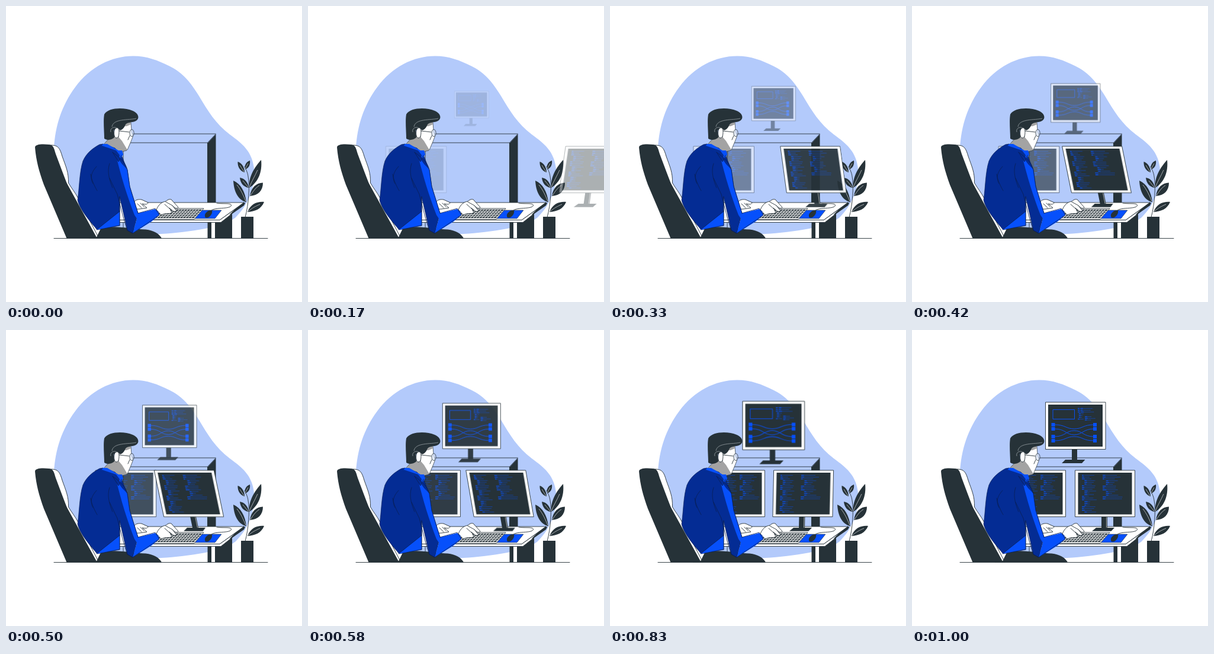
These frames come from a looping animation (500x500 px, 1.04 s). An HTML page:

```html
<!DOCTYPE html>
<html lang="en">
<head>
<meta charset="utf-8">
<title>Desk with monitors</title>
<style>
  html, body { margin: 0; width: 100%; height: 100%; overflow: hidden; background: #fff; }
  svg { display: block; width: 100vw; height: 100vh; }
  .ink { fill: #263238; }
  .paper { fill: #fff; stroke: #263238; stroke-width: .9; stroke-linejoin: round; }
  .line { fill: none; stroke: #263238; stroke-width: .9; stroke-linecap: round; stroke-linejoin: round; }
  .navy { fill: #042c94; }
  .blue { fill: #0650fb; }
  .grey { fill: #a3a3a3; }
  .fold { fill: none; stroke: #0a1f55; stroke-width: .8; stroke-linecap: round; }
  .vein { fill: none; stroke: #fff; stroke-width: .6; }
  .glow { fill: none; stroke: #0b50f0; stroke-width: 1; }
  .bold, .thin { fill: none; stroke: #0b4de0; stroke-width: 1.5; }
  .thin { stroke-width: .9; stroke-dasharray: 1.3 .8; }
  #left, #right, #top { transform-box: view-box; }
  #right { transform-origin: 325.5px 288px; }
  #top { transform-origin: 276.2px 173px; }
</style>
</head>
<body>
<svg viewBox="0 0 500 500" xmlns="http://www.w3.org/2000/svg">
  <path fill="#b3cafb" d="M81 240C83 203 94 168 117 137C142 103 178 84.500 215 84.500C238 84.500 257 92 275 101C299 112 313 131 326 152C341 177 354 199 378 217C400 233 416 246 419 275C421 305 411 334 388 357C368 374 310 382 262 385C200 389 140 380 105 330C88 302 80 270 81 240Z"/>

  <!-- shelf -->
  <path class="line" d="M200 216H354M198 231H340M198 231V332M198 366V380"/>
  <path class="ink" d="M340 231L354.500 215.500V333H340Z"/>
  <path d="M341 231L354 217" stroke="#7f93c4" stroke-width=".5"/>

  <!-- desk -->
  <path class="ink" d="M340.500 364H347V392H340.500ZM353 392V366H361L382 350V392Z"/>
  <path fill="#fff" d="M347 365H353V392H347Z"/>
  <path class="paper" d="M190 361.500H361L402 332.500L384 349L363 365.500H190Z"/>
  <path class="paper" d="M190 332H402L361 361.500H190Z"/>
  <path class="ink" d="M402 331.500L404 333L402 337L382 351L377 353L386 344Z"/>
  <path class="blue" stroke="#263238" stroke-width=".6" d="M331 345H364L353 359H319Z"/>
  <path class="line" d="M346 346C352 339 378 344 380.500 337C381 332 366 335 356 333"/>
  <path class="ink" d="M336 355C335 350 341 345 347 345C350 347 347 354 342 357C339 358 336 358 336 355Z"/>

  <path class="line" d="M81 392.500H442"/>

  <!-- plant -->
  <path class="line" d="M404 357C410 335 412 304 409 288C408 280 405 276 403 271"/>
  <g class="ink">
    <path d="M397 356H418V392.500H397Z"/>
    <path d="M411 307C409 289 420 272 431 260C433 279 427 297 411 307Z"/>
    <path d="M406 331.500C404 313 396 300 384 295C385 313 391 327 406 331.500Z"/>
    <path d="M412 321C414 306 423 299 434 298.500C434 312 426 320 412 321Z"/>
    <path d="M408 348C413 334 425 330 436 331C431 343 421 347 408 348Z"/>
    <path d="M410 307C409 298 403 291 395 290C396 300 402 306 410 307Z"/>
    <path d="M403 281C403 272 398 265 391.500 263C391 271 395 279 403 281Z"/>
    <path d="M404 276C402 269 406 263 412 261C413 268 410 274 404 276Z"/>
  </g>
  <path class="vein" d="M411 306C415 296 420 288 425 277M405 330C401 320 397 311 390 302M413 320C418 312 422 307 428 303M409 347C416 341 422 338 429 335M409 306L400 295M402 280L395 269M404 275L409 266"/>

  <!-- monitors -->
  <g id="left">
    <path class="paper" d="M157 237H259.500V315.500H157Z"/>
    <path class="ink" d="M162 241H254.500V311.500H162Z"/>
    <path class="bold"/><path class="thin"/>
  </g>
  <g id="top">
    <path class="ink" d="M270 201H279V220H270ZM259 219H292.500L287 225H253Z"/>
    <path class="paper" d="M225.500 122H327V201.500H225.500Z"/>
    <path class="ink" d="M230 126H322V197H230Z"/>
    <path class="glow" d="M238 134.500H274.500V150.500H238Z"/>
    <path id="waves" class="glow"/>
    <path id="ports" class="blue"/>
    <path class="bold"/><path class="thin"/>
  </g>
  <g id="right">
    <path class="ink" d="M320 315H330V335H320ZM311 334H342L336.500 339.700H304Z"/>
    <path d="M328.500 316V334" stroke="#fff" stroke-width=".6"/>
    <path class="paper" d="M275.500 237H376.500V315.500H275.500Z"/>
    <path class="ink" d="M280.500 241H371.500V311.500H280.500Z"/>
    <path class="bold"/><path class="thin"/>
  </g>

  <!-- keyboard -->
  <path class="paper" d="M262 342H334L318 360H246Z"/>
  <path class="ink" d="M264 343.800H331L317.500 358H250Z"/>
  <path id="keys" fill="none" stroke="#fff" stroke-width="1"/>

  <!-- chair -->
  <path class="paper" d="M76 235C88 235 91 240 95 254C101 271 106 281 105.500 299C110 307 117 315 122 325L157 392.500H140Z"/>
  <path class="ink" d="M49 239C49 233 62 233 72 234C80 234 81 240 84 250L102 298L154 392.500H102.500L64 302C56 280 51 262 49 239Z"/>

  <!-- person -->
  <path class="ink" d="M152 392.500L160 376C185 369 212 377 236 377.500C250 379 259 385 263 392.500Z"/>
  <path class="paper" d="M216 333C217 328 222 326 229 327L240 332C239 336 234 335 230 334L238 341L225 343L217 343Z"/>
  <path class="line" d="M222 334L229 341M227 333L233 339"/>
  <path class="paper" d="M254 344C258 335 263 331 270 330C274 326 279 325 281 329L291 340C289 344 285 341 281 337L288 346C285 349 280 345 276 341L280 349C276 352 270 349 262 353Z"/>
  <path class="line" d="M270 331L281 337M268 335L276 342"/>

  <path class="grey" stroke="#263238" stroke-width=".6" d="M183 218L170 228L165 234L184 242L192 247L204 244L203 230Z"/>
  <path fill="#fff" stroke="#263238" stroke-width=".7" d="M190 203L211 197L212 210L214.500 220L211 229L205 243L198 236L190 222Z"/>
  <path class="grey" d="M196 203L202 196L211 195L211 200L204 203ZM189 220L196 228L205 243L196 244L188 229Z"/>
  <path class="ink" d="M166 183C173 171 200 171 214 177C223 181 226 188 221 193C215 198 206 195 202 200C199 207 196 209 193 210L189 207L182 210L183 222C178 227 170 227 166 224C166 212 164 194 166 183Z"/>
  <path fill="none" stroke="#a9b1b5" stroke-width=".7" d="M179 204C181 190 207 193 220 190M177 213C175 207 182 203 187 206"/>
  <path class="paper" stroke-width=".6" d="M183 211C184 204 191 204 191 211C191 219 190 223 186 223C183 222 182 216 183 211Z"/>
  <path class="line" d="M191 211L208 213M209 219L206 226"/>
  <ellipse cx="212.500" cy="214.500" rx="3.600" ry="6" fill="#d9e4fc" fill-opacity=".6" stroke="#263238" stroke-width=".8"/>

  <path class="navy" stroke="#0a1f55" stroke-width=".7" d="M158 234C147 240 136 248 130 262C124 280 124 308 121 328C125 345 144 366 154 378L192 371L192 322L205 379L214 384L223 350L209 305L205 277L195 252L184 240L164 233Z"/>
  <path class="blue" d="M153 378L192 347L192 370ZM186 253L196 267L205 276L209 305L223 350L252 343L257 347L259 353L246 364L214 384L221 359L217 353C205 322 194 287 186 253Z"/>
  <path class="blue" d="M164 233L171 233L190 244L196 244L198 251L193 258L185 247L161 237Z"/>
  <path class="navy" d="M162 236L186 244L192 252L190 263L179 248L158 238Z"/>
  <path class="fold" d="M180 247C195 258 202 265 205 277L209 305L223 350M223 350L252 342L259 353L214 384L205 379C198 360 194 340 188 318L175 291M192 371V322M192 347L153 378M143 284C145 296 151 307 154 312M153 271C143 282 142 291 147 300M175 266C170 280 175 295 180 307M180 247L190 263L195 252"/>
</svg>
<script>
  const $ = q => document.querySelector(q);
  const setPath = (q, d) => $(q).setAttribute('d', d);

  function random(seed) {
    return () => (seed = (seed * 16807) % 2147483647) / 2147483647;
  }

  // Each row of code: a solid word, then a dotted rest; every other block is indented.
  function write(id, cols) {
    const rnd = random(4217);
    let bold = '', thin = '';
    for (const [x, y, rows, step, width] of cols) {
      for (let i = 0; i < rows; i++) {
        const row = y + i * step;
        const indent = i % 6 > 2 ? width * .17 : 0;
        const word = 3 + rnd() * width * .12;
        const rest = width * (.4 + rnd() * .6) - indent - word;
        bold += `M${x + indent} ${row}h${word}`;
        if (rest > 1) thin += `M${x + indent + word + .8} ${row}h${rest}`;
      }
    }
    setPath(`#${id} .bold`, bold);
    setPath(`#${id} .thin`, thin);
  }
  write('right', [[287, 245.5, 22, 2.95, 25], [322, 245.5, 14, 3.05, 33]]);
  write('left', [[191, 245.5, 22, 2.95, 22], [217, 245.5, 14, 3.05, 32]]);
  write('top', [[280, 132.5, 7, 3, 10], [285, 132.5, 3, 3, 23], [292, 146.5, 3, 2.8, 21]]);

  const wave = ([y, mid]) =>
    `M241 ${y}C259 ${y} 260 ${mid} 274 ${mid}S289 ${y} 307 ${y}`;
  setPath('#waves', [[160, 167], [167, 177], [180, 170], [187, 180]].map(wave).join(''));
  const port = y => `M235.500 ${y - 3}h6v6h-6zM306 ${y - 3}h6v6h-6z`;
  setPath('#ports', [160, 167, 180, 187].map(port).join(''));

  let grid = '';
  for (let i = 1; i < 5; i++) grid += `M${264 - i * 2.8} ${343.8 + i * 2.84}h67`;
  for (let i = 1; i < 14; i++) grid += `M${264 + i * 4.8} 343.8l-13.8 14.2`;
  setPath('#keys', grid);

  const easing = 'cubic-bezier(.36,-.01,.5,1.38)';
  const parts = {
    left: [
      { transform: 'translateX(-30px)', opacity: 0 },
      { transform: 'translateX(0)', opacity: 1 }
    ],
    top: [
      { transform: 'scale(.5)', opacity: 0 },
      { transform: 'scale(1)', opacity: 1 }
    ],
    right: [
      { transform: 'translateX(250px) skewX(-20deg)', opacity: 0 },
      { transform: 'translateX(0) skewX(10deg)', opacity: 1, offset: .6 },
      { transform: 'translateX(0) skewX(-2deg)', opacity: 1, offset: .8 },
      { transform: 'translateX(0) skewX(0deg)', opacity: 1 }
    ]
  };
  const moves = Object.entries(parts).map(([id, steps]) => {
    const move = $('#' + id).animate(
      steps.map(s => ({ ...s, easing })), { duration: 1000, fill: 'both' });
    move.pause();
    return move;
  });

  // 25 held steps per loop, sampled at 24 per second.
  const loop = 1040, count = 25;
  const start = performance.now();
  function draw(now) {
    const t = Math.max(0, now - start) % loop;
    const k = Math.min(count - 1, Math.floor((t + 4) / (loop / count)));
    const at = Math.min(1000, k * 1000 / 24 + 33);
    moves.forEach(m => { m.currentTime = at; });
    requestAnimationFrame(draw);
  }
  draw(start);
</script>
</body>
</html>
```
